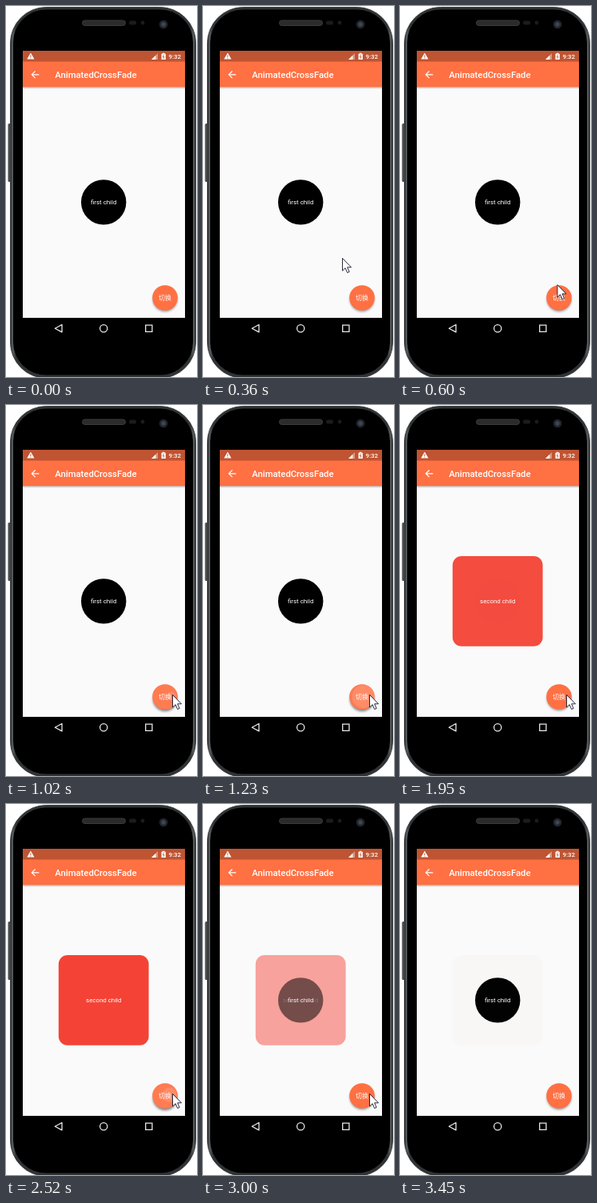
Animation, 239 px wide and 464 px high, one loop 4.02 s. Source, as an HTML page:

```html
<!DOCTYPE html>
<html lang="en">
<head>
<meta charset="utf-8">
<title>Cross-fade demo</title>
<style>
  html, body { margin: 0; width: 100%; height: 100%; overflow: hidden; background: #fff; }
  svg { display: block; width: 100%; height: 100%; }
  text { fill: #fff; font: 7.9px Roboto, sans-serif; }
  .title { font-size: 11.28px; font-weight: 500; }
  .clock { font-weight: 500; }
  .middle { text-anchor: middle; }
  .cjk { font-family: "Noto Sans CJK SC", "Noto Sans CJK", sans-serif; }
</style>
</head>
<body>
<svg viewBox="0 0 239 464">
  <defs>
    <linearGradient id="rim">
      <stop offset="0" stop-color="#25282a"/>
      <stop offset=".012" stop-color="#5b5f61"/>
      <stop offset=".03" stop-color="#303335"/>
      <stop offset=".97" stop-color="#303335"/>
      <stop offset=".988" stop-color="#5b5f61"/>
      <stop offset="1" stop-color="#25282a"/>
    </linearGradient>
    <linearGradient id="barShadow" x2="0" y2="1">
      <stop offset="0" stop-opacity=".28"/>
      <stop offset="1" stop-opacity="0"/>
    </linearGradient>
    <filter id="blur" x="-40%" y="-40%" width="180%" height="180%">
      <feGaussianBlur stdDeviation="1.7"/>
    </filter>
    <clipPath id="screen"><path d="M21 56h203v334H21z"/></clipPath>
    <clipPath id="buttonClip"><circle cx="199" cy="365" r="15.8"/></clipPath>
  </defs>

  <!-- Phone body -->
  <rect x="2.5" y="147" width="4" height="73" rx="1.5" fill="#4a4d4f"/>
  <rect x="5.5" y="1.5" width="232" height="464" rx="45" fill="url(#rim)" stroke="#3c3f41"/>
  <rect x="9" y="4.5" width="225" height="457" rx="41"/>
  <rect x="95.5" y="18" width="54" height="6.5" rx="3.2" fill="#2b2b2b" stroke="#3b3b3b"/>
  <rect x="154" y="18.5" width="9" height="5" rx="2" fill="#1b1b1d"/>
  <circle cx="171" cy="21" r="2.4" fill="#1b1b1d"/>
  <circle cx="197" cy="23" r="5.3" fill="#22262c"/>
  <circle cx="197" cy="23" r="2.7" fill="#3d4654"/>

  <g fill="none" stroke="#e8e8e8" stroke-width="1.3">
    <path d="M70 398.5v9.4l-8.7-4.7z" stroke-linejoin="round"/>
    <circle cx="122.2" cy="403.2" r="4.6"/>
    <path d="M174.7 399.2h8.2v8.2h-8.2z"/>
  </g>

  <!-- App screen -->
  <g clip-path="url(#screen)">
    <path d="M21 56h203v334H21z" fill="#fafafa"/>
    <path d="M21 101h203v3H21z" fill="url(#barShadow)"/>
    <path d="M21 69h203v32.3H21z" fill="#ff7043"/>
    <path d="M21 56h203v13.5H21z" fill="#bf5432"/>
    <path d="M30.9 58.6l4.6 8h-9.2z" fill="#fff"/>
    <path d="M30.9 61.3v2.6m0 .7v1" stroke="#bf5432"/>
    <path d="M182 67l8-8v8z" fill="#fff" opacity=".4"/>
    <path d="M182 67l5.3-5.3V67z" fill="#fff"/>
    <path d="M194.5 59.7h1.3v-1h2.6v1h1.4v7.4h-5.3z" fill="#fff"/>
    <path d="M197.7 60.5l-1.5 3h1.7l-.9 2.6" fill="none" stroke="#bf5432" stroke-width=".8"/>
    <text class="clock" x="203.5" y="66">9:32</text>
    <path d="M41.3 85.8h-9m4.3-4.3l-4.3 4.3 4.3 4.3" fill="none" stroke="#fff" stroke-width="1.2"/>
    <text class="title" x="61.3" y="90">AnimatedCrossFade</text>

    <g id="children">
      <g id="second">
        <rect x="65.8" y="189" width="112.8" height="112.8" rx="11.3" fill="#f44336"/>
        <text class="middle" x="122.3" y="248">second child</text>
      </g>
      <g id="first">
        <circle cx="122.2" cy="245.4" r="28.2"/>
        <text class="middle" x="122.2" y="248">first child</text>
      </g>
    </g>

    <circle id="shadow" cx="199" cy="367" r="15.3" opacity=".4" filter="url(#blur)"/>
    <circle cx="199" cy="365" r="15.8" fill="#ff7043"/>
    <g clip-path="url(#buttonClip)" fill="#fff">
      <circle id="highlight" cx="199" cy="365" r="15.8"/>
      <circle id="splash"/>
    </g>
    <text class="middle cjk" x="199" y="368.2">切换</text>
  </g>

  <path id="cursor" d="M.5.5v15.6l3.6-3.4 2.5 5.8 2.5-1-2.5-5.7h4.9z" fill="#fff" stroke="#15152a" stroke-width=".9"/>
</svg>
<script>
const LOOP = 4020, TICK = 30, PRESSES = [1020, 2430];
const $ = id => document.getElementById(id);
const clamp = v => Math.max(0, Math.min(1, v));

// [time, opacity of the second child], each held until the next
const FADE = [
  [0, 0], [1530, .02], [1590, .2], [1650, .42], [1710, .61], [1770, .77],
  [1860, .88], [1950, .95], [2040, 1],
  [2970, .75], [3000, .475], [3060, .27], [3120, .12], [3210, .04], [3300, .01]
];

// [time, x, y] of the pointer tip
const POINTER = [
  [210, 216, 190], [330, 172, 296], [360, 174, 315], [510, 190, 340],
  [720, 205, 359], [750, 208, 362], [3210, 208, 362], [3450, 240, 336]
];

const held = (keys, t) => keys.findLast(k => k[0] <= t)[1];

function pointerAt(t) {
  const i = POINTER.findIndex(k => k[0] > t);
  if (i < 1) return null;
  const [t0, x0, y0] = POINTER[i - 1], [t1, x1, y1] = POINTER[i];
  const p = (t - t0) / (t1 - t0);
  return [x0 + (x1 - x0) * p, y0 + (y1 - y0) * p];
}

function set(id, attributes) {
  for (const name in attributes) $(id).setAttribute(name, attributes[name]);
}

function drawButton(t) {
  const start = PRESSES.findLast(p => p <= t) ?? -Infinity;
  const age = t - start;
  const active = age < 510;
  const grow = clamp((age + TICK) / 300);
  const fade = active ? 1 - clamp((age - 210) / 300) : 0;
  set('highlight', { opacity: .08 * fade });
  set('splash', {
    cx: 208 - 9 * grow, cy: 363 + 2 * grow,
    r: 4 + 13 * grow, opacity: .12 * fade
  });
  set('shadow', { cy: 367 + fade, opacity: .4 + .06 * fade });
}

function draw(time) {
  const t = Math.floor(time % LOOP / TICK) * TICK;
  const mix = held(FADE, t);
  set('first', { opacity: 1 - mix });
  set('second', { opacity: mix });

  // The incoming child is painted on top.
  const top = $(t >= 1530 && t < 2940 ? 'second' : 'first');
  if ($('children').lastElementChild !== top) $('children').append(top);

  drawButton(t);
  const tip = pointerAt(t);
  set('cursor', {
    visibility: tip ? 'visible' : 'hidden',
    transform: `translate(${tip || [0, 0]})`
  });
}

const begin = performance.now();
function frame() {
  draw(performance.now() - begin);
  requestAnimationFrame(frame);
}
frame();
</script>
</body>
</html>
```
